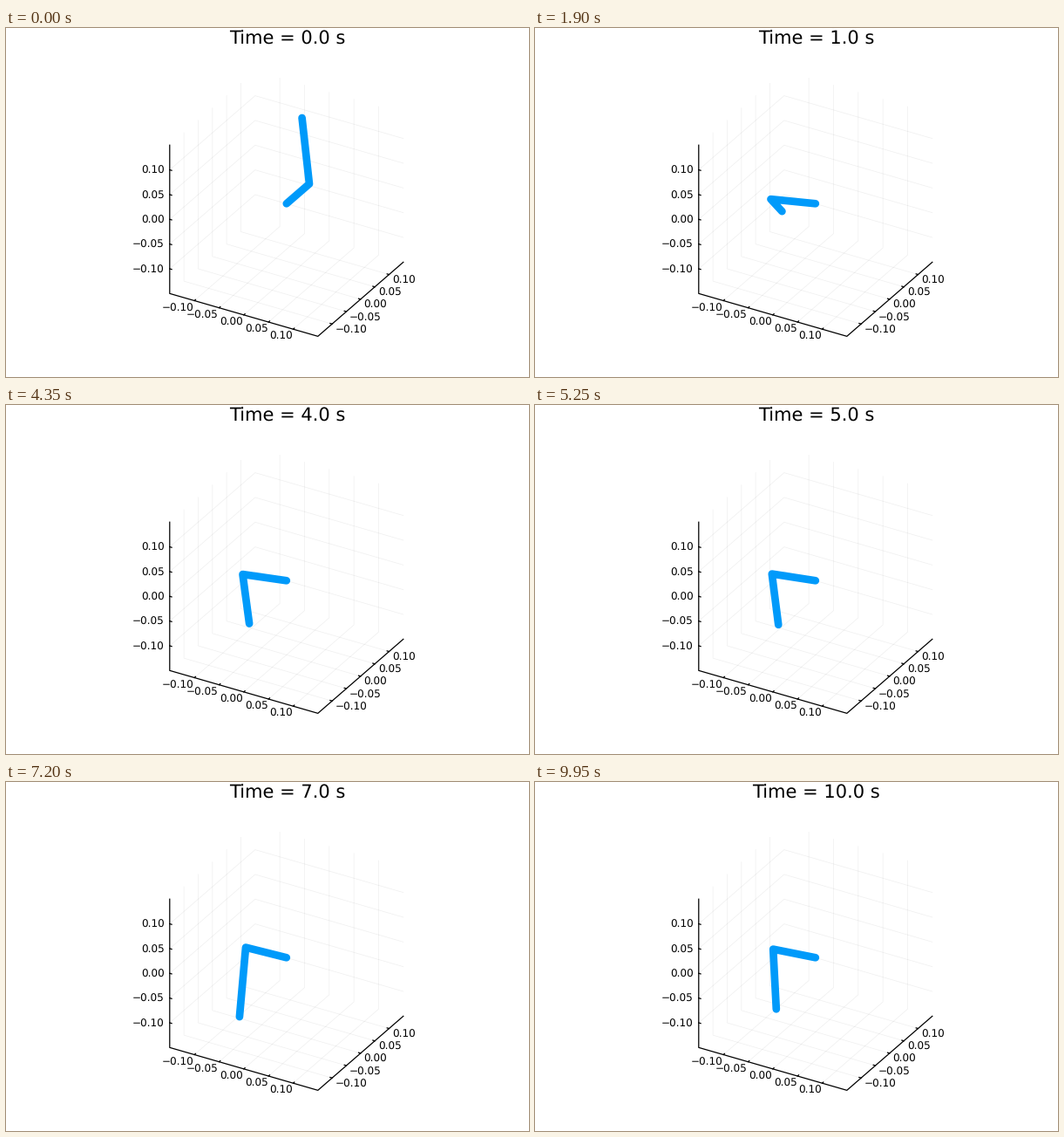
Recreate the animation shown at these times as a matplotlib script. Size 600x400 px, loop 10000 ms.

```python
import numpy as np
import matplotlib.pyplot as plt
from matplotlib.animation import FuncAnimation

W, H, DPI = 600, 400, 100
PT = 72 / DPI
FRAMES, INTERVAL = 200, 50
ARM, ROD, LIM = 0.08, 0.13, 0.15
TICKS = np.linspace(-0.10, 0.10, 5)
FALL = 19  # steps until the rod has fallen and swung back once

plt.rcParams["font.family"] = "DejaVu Sans"
plt.rcParams["text.hinting"] = "none"

fig = plt.figure(figsize=(W / DPI, H / DPI), dpi=DPI, facecolor="white")
ax = fig.add_axes([0, 0, 1, 1])
ax.set_xlim(0, W)
ax.set_ylim(H, 0)
ax.axis("off")


def project(x, y, z):
    """Orthographic view, azimuth 30 and elevation 30 degrees, in pixels."""
    return (321.8 + 566.7 * x + 326.7 * y,
            201.3 + 163.4 * x - 283.3 * y - 567 * z)


def path(*points, **style):
    x, y = project(*np.transpose(points))
    ax.plot(x, y, snap=False, **style)


def label(x, y, value, ha):
    text = f"{value:.2f}".replace("-", "\u2212")
    ax.text(x, y + 4.4, text, ha=ha, va="baseline", fontsize=12 * PT)


def draw_box():
    grid = dict(color="black", alpha=0.06, lw=0.8 * PT, zorder=1)
    edge = dict(color="black", lw=1.25 * PT, zorder=2)
    a, tick = LIM, 0.004
    for t in np.round(TICKS, 2) + 0.0:
        path((t, -a, -a), (t, a, -a), (t, a, a), **grid)
        path((a, t, -a), (-a, t, -a), (-a, t, a), **grid)
        path((-a, -a, t), (-a, a, t), (a, a, t), **grid)
        path((t, -a, -a), (t, -a + tick, -a), **edge)
        path((a, t, -a), (a - tick, t, -a), **edge)
        path((-a, -a, t), (-a + tick, -a, t), **edge)

        x, y = project(t, -a, -a)
        label(x - 0.6, y + 7.6, t, "right")
        x, y = project(a, t, -a)
        label(x + 3.6, y + 6, t, "left")
        x, y = project(-a, -a, t)
        label(x - 6, y, t, "right")
    path((-a, -a, a), (-a, -a, -a), (a, -a, -a), (a, a, -a), **edge)


def smoothstep(x):
    x = np.clip(x, 0, 1)
    return x * x * (3 - 2 * x)


def clock(i):
    """Simulated seconds: solver steps start short and settle at a fixed size."""
    return 0.0537 * i - 0.686 * (1 - np.exp(-i / 24))


def swing_phase(i):
    if i < FALL:
        return 4.82 * (i / FALL) ** 2
    return np.interp(i, [FALL, 58, 87, 124, 165, 199],
                     [4.82, 26.28, 47.66, 72.87, 102.70, 128.07])


def pose(i):
    """Arm angle and rod angle from hanging straight down, in radians."""
    amp = 1.55 / np.hypot(clock(i), 0.512)  # drag makes the swing decay as 1/t
    phase = swing_phase(i)
    sway = 21 * amp / (1 + 0.3 * amp**2 + 0.15 * amp**4)
    center = 93.7 + 92.8 * smoothstep((i - 7) / 8)
    center += 9 * np.exp(-((i - 28) / 7) ** 2)
    theta = center - sway * np.cos(phase - 0.27)
    return np.radians(theta), amp * np.cos(phase)


draw_box()
title = ax.text(322.5, 19, "", ha="center", va="baseline", fontsize=21 * PT)
rod, = ax.plot([], [], color="#009afa", lw=8.7 * PT, zorder=3,
               solid_capstyle="round", solid_joinstyle="round")


def update(i):
    theta, phi = pose(i)
    c, s = np.cos(theta), np.sin(theta)
    elbow = np.array([ARM * c, ARM * s, 0])
    tip = elbow + ROD * np.array([-s * np.sin(phi), c * np.sin(phi),
                                  -np.cos(phi)])
    rod.set_data(*project(*np.transpose([np.zeros(3), elbow, tip])))
    title.set_text(f"Time = {np.floor(clock(i) + 0.5):.1f} s")
    return rod, title


anim = FuncAnimation(fig, update, frames=FRAMES, interval=INTERVAL,
                     repeat=True, repeat_delay=0)
plt.show()
```
